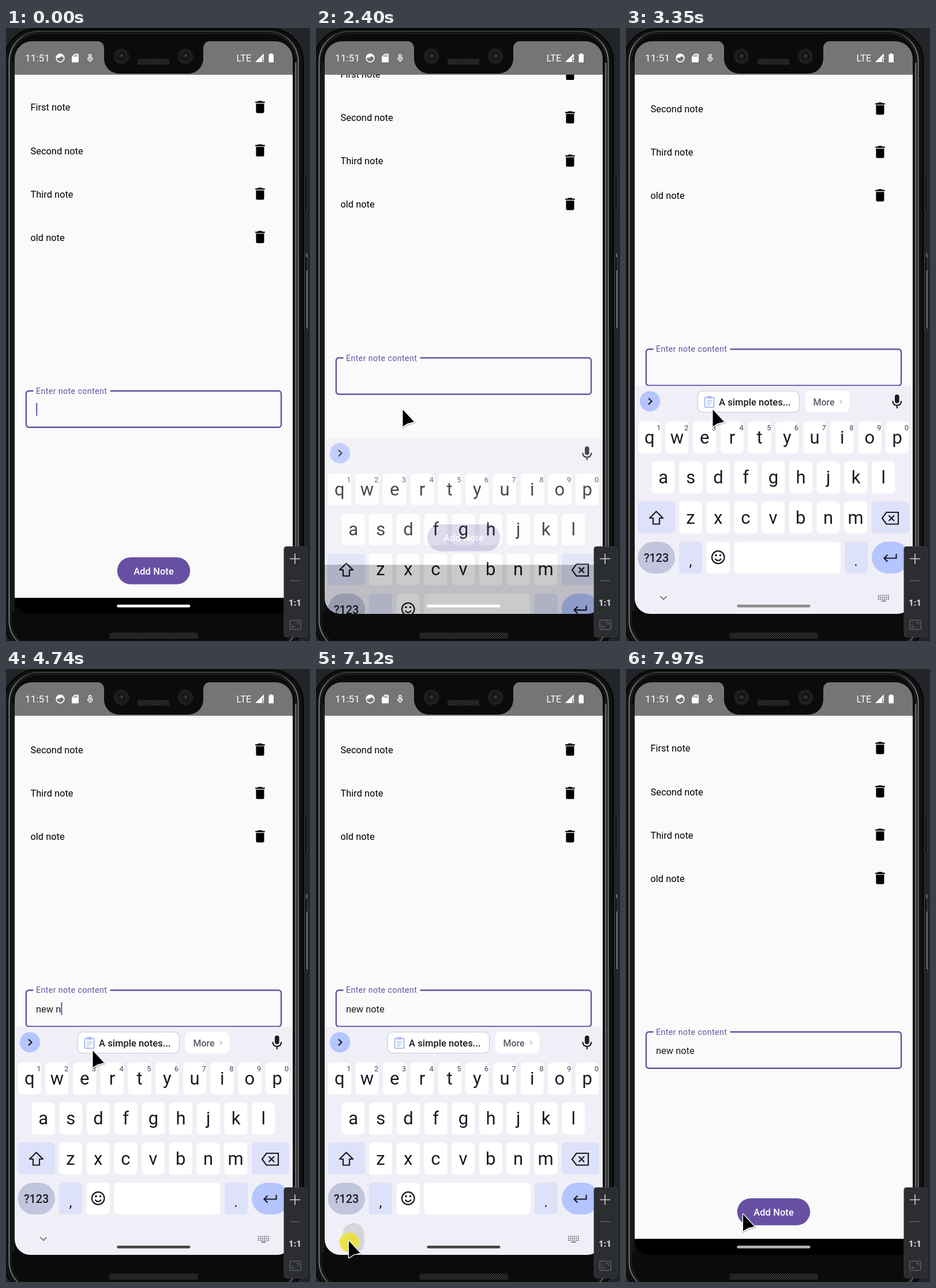
Write an HTML page that moves like this. It is 527 by 1062 pixels and loops after 8000 ms.

```html
<!DOCTYPE html>
<html lang="en">
<head>
<meta charset="utf-8">
<title>Notes app with keyboard</title>
<style>
html, body { margin: 0; width: 100%; height: 100%; overflow: hidden; background: #222427; }
svg { display: block; width: 527px; height: 1062px; }
text { font-family: Roboto, "Open Sans", sans-serif; white-space: pre; }
.note { font-size: 16.4px; fill: #1c1b1f; }
.mid { text-anchor: middle; }
.line { fill: none; stroke: #1b1b21; stroke-width: 2.2; }
</style>
</head>
<body>
<svg viewBox="0 0 527 1062" xmlns="http://www.w3.org/2000/svg">
  <defs>
    <clipPath id="screen"><path d="M15 53A30 30 0 0 1 45 23H467A30 30 0 0 1 497 53V988A27 27 0 0 1 470 1015H42A27 27 0 0 1 15 988Z"/></clipPath>
    <clipPath id="app"><rect x="15" y="80.5" width="482" height="936"/></clipPath>
    <linearGradient id="rim" x1="0" x2="1" y1="0" y2="0">
      <stop offset="0" stop-color="#7c7e7f"/><stop offset=".06" stop-color="#3a3c3d"/>
      <stop offset=".94" stop-color="#3a3c3d"/><stop offset="1" stop-color="#7c7e7f"/>
    </linearGradient>
    <pattern id="mesh" width="4" height="4" patternUnits="userSpaceOnUse">
      <rect width="4" height="4" fill="#0c0c0c"/>
      <path d="M0 0L4 4M4 0L0 4" stroke="#484848" stroke-width=".8"/>
    </pattern>
    <path id="bin" transform="scale(1.172)" d="M6 19c0 1.1.9 2 2 2h8c1.1 0 2-.9 2-2V7H6v12zM19 4h-3.5l-1-1h-5l-1 1H5v2h14V4z"/>
  </defs>

  <g id="device">
    <rect width="527" height="1062" fill="#222427"/>
    <rect x="517.5" y="252" width="5" height="66" rx="2" fill="#161718" stroke="#34373a"/>
    <rect x="517.5" y="390" width="5" height="135" rx="2" fill="#161718" stroke="#45484a"/>
    <path d="M521 391V397M521.5 420V520" stroke="#85888a" stroke-width="1.5"/>
    <rect x="-3" y="1.5" width="518" height="1082" rx="56" fill="#111213" stroke="#070707" stroke-width="3"/>
    <rect x="5.5" y="6" width="501" height="1072" rx="52" fill="#0a0b0b" stroke="url(#rim)" stroke-width="2"/>
    <rect x="9" y="9.5" width="494" height="1065" rx="48" fill="#0a0b0b" stroke="#1d1f1f" stroke-width="2"/>
    <path d="M502.3 60V1010" stroke="#606263" stroke-width="3"/>
    <path d="M12.5 60V1010" stroke="#2c2e2e" stroke-width="1.5"/>
    <rect x="179" y="1047.5" width="154" height="10.5" rx="3" fill="url(#mesh)"/>
  </g>

  <g clip-path="url(#screen)">
    <rect x="15" y="23" width="482" height="993"/>
    <g clip-path="url(#app)">
      <g id="content">
        <rect x="15" width="482" height="987.2" fill="#fafafa"/>
        <g id="list"></g>
        <path d="M47.5 628.8H39.5A4.6 4.6 0 0 0 34.9 633.4V687.2A4.6 4.6 0 0 0 39.5 691.8H472.5A4.6 4.6 0 0 0 477.1 687.2V633.4A4.6 4.6 0 0 0 472.5 628.8H180.5" fill="none" stroke="#6750a4" stroke-width="2.4"/>
        <text x="52" y="633.8" font-size="14.06" letter-spacing=".47" fill="#6750a4">Enter note content</text>
        <text id="typed" class="note" x="52" y="667.3"></text>
        <rect id="under" x="86.2" y="668.3" width="33" height="1.3" fill="#1c1b1f"/>
        <rect id="caret" y="649.7" width="2" height="22" fill="#6750a4"/>
        <rect x="192.8" y="917" width="126.4" height="46.8" rx="23.4" fill="#6750a4"/>
        <text class="mid" x="256" y="946.6" font-size="16.4" font-weight="500" letter-spacing=".12" fill="#fff">Add Note</text>
      </g>
      <g id="keyboard">
        <rect x="15" y="620" width="482" height="420" fill="#f0eff7"/>
        <g id="keys"></g>
      </g>
    </g>
    <rect x="15" y="23" width="482" height="57.5" fill="#757575"/>
    <rect id="handle" x="192.3" y="999" width="127.2" height="4.8" rx="2.4"/>
  </g>

  <path d="M158 22.5A12 12 0 0 1 170 34.5V53A26 26 0 0 0 196 79H316A26 26 0 0 0 342 53V34.5A12 12 0 0 1 354 22.5Z" fill="#0a0b0b"/>
  <g id="lenses"></g>
  <rect x="228" y="53.5" width="55" height="10" rx="3" fill="url(#mesh)"/>

  <g fill="#fff">
    <text x="33" y="58" font-size="17.3">11:51</text>
    <text x="399.5" y="57.5" font-size="16.4">LTE</text>
    <circle cx="94" cy="52" r="6.9" fill="none" stroke="#fff" stroke-width="1.6"/>
    <path d="M87.5 52Q88 45.5 94 45.5T100.5 52Q98 50.5 97 48.5Q93 52 87.5 52Z"/>
    <path d="M119 44.5H124.5Q126 44.5 126 46V58Q126 59.5 124.5 59.5H115.5Q114 59.5 114 58V49.5Z"/>
    <path d="M117.7 47.5V50M120.3 46V50M122.9 46V50" stroke="#757575" stroke-width="1.3"/>
    <circle cx="145.8" cy="48" r="2.2" fill="none" stroke="#fff" stroke-width="1.4"/>
    <path d="M145.8 57.8L142 54Q141.2 51.6 143.4 51.6Q145 51.8 145.8 53.4Q146.6 51.8 148.2 51.6Q150.4 51.6 149.6 54Z" fill="none" stroke="#fff" stroke-width="1.4"/>
    <path d="M447 44V59H432Z"/>
    <path d="M444 50.5H447.5V59.5H444Z" fill="#757575"/>
    <path d="M445.2 51H447V56H445.2ZM445.2 57.3H447V59H445.2Z"/>
    <path d="M457.7 44H461.7V45.6H464V59.5H455.5V45.6H457.7Z"/>
  </g>

  <g id="tools">
    <rect x="482" y="898.5" width="40" height="156.5" rx="4" fill="#2b2d30" stroke="#393b40"/>
    <path d="M492 919.5H510M501 910.5V928.5" stroke="#ced0d6" stroke-width="1.6"/>
    <path d="M492 957.5H510" stroke="#5b5e63" stroke-width="1.5"/>
    <text class="mid" x="501" y="1001" font-size="15" font-weight="900" fill="#ced0d6">1:1</text>
    <g fill="none" stroke="#5b5e63" stroke-width="1.5">
      <rect x="492" y="1026" width="19" height="16" rx="2"/>
      <path d="M502.5 1030H507V1034M500.5 1038H496V1034"/>
    </g>
  </g>

  <g id="pointer">
    <circle id="click" cx="1.3" cy="4" r="17.3" fill="#eee534" opacity=".86"/>
    <path d="M1 3V31.5L9.5 26.5L21 23.5Z" opacity=".18" stroke="#000" stroke-width="4" stroke-linejoin="round"/>
    <path d="M.5 1.2V30.3L8.8 25L20 22.2Z" stroke="#fff" stroke-width="2.6" stroke-linejoin="round" paint-order="stroke"/>
  </g>
</svg>
<script>
const $ = id => document.getElementById(id);
const clamp = v => Math.max(0, Math.min(1, v));
const within = (t, spans) => spans.some(([a, b]) => t >= a && t < b);

// Piecewise linear track: each stop is [time, ...values]
function track(stops, t) {
  let i = 0;
  while (i < stops.length - 2 && t >= stops[i + 1][0]) i++;
  const a = stops[i], b = stops[i + 1], k = clamp((t - a[0]) / (b[0] - a[0]));
  return a.slice(1).map((v, n) => v + (b[n + 1] - v) * k);
}

// Cubic bezier ease (.2, 0, 0, 1)
function ease(x) {
  if (x <= 0) return 0;
  if (x >= 1) return 1;
  let lo = 0, hi = 1, s;
  for (let i = 0; i < 24; i++) {
    s = (lo + hi) / 2;
    if (.6 * s * (1 - s) ** 2 + s ** 3 < x) lo = s; else hi = s;
  }
  return s * s * (3 - 2 * s);
}

// Static parts
$('list').innerHTML = ['First note', 'Second note', 'Third note', 'old note'].map((name, i) => {
  const y = i * 75.1;
  return `<text class="note" x="42.5" y="${143.4 + y}" style="fill:#000">${name}</text>
    <use href="#bin" x="426.4" y="${122.8 + y}"/>`;
}).join('');

$('lenses').innerHTML = [200, 311].map(x =>
  `<circle cx="${x}" cy="49" r="13.5" fill="#1b1d1f"/><circle cx="${x}" cy="49" r="8.5" fill="#111314" stroke="#292c2e"/>
   <circle cx="${x}" cy="49" r="4" fill="#23272a"/><circle cx="${x + 1}" cy="47.5" r="1.5" fill="#43484c"/>`).join('');

const key = (x, y, w, fill = '#fff', r = 6) =>
  `<rect x="${x}" y="${y}" width="${w}" height="55" rx="${r}" fill="${fill}"/>`;
const label = (x, y, size, s, fill = '#1b1b21', more = '') =>
  `<text class="mid" x="${x}" y="${y}" font-size="${size}" fill="${fill}" ${more}>${s}</text>`;
const icon = (d, more = '') => `<path class="line" d="${d}" ${more}/>`;

function buildKeys() {
  const pitch = 47.7, tint = '#dde1f9';
  let out = '';
  [['qwertyuiop', 40.8], ['asdfghjkl', 64.6], ['zxcvbnm', 112]].forEach(([row, x0], r) => {
    [...row].forEach((c, i) => {
      const x = x0 + i * pitch, y = 682 + r * 69.3;
      out += key(x - 20, y, 40) + label(x, y + 38, 31, c);
      if (!r) out += label(x + 16.2, 697, 13, (i + 1) % 10, '#45464f');
    });
  });
  out += key(20.5, 820.6, 64.5, tint) + key(426, 820.6, 65, tint);
  out += key(20.5, 890, 64.5, '#c1c5dd', 27.5) + key(92, 890, 40, tint) + key(139.7, 890, 40);
  out += key(187.4, 890, 184) + key(379, 890, 40, tint) + key(426, 890, 65, '#b4c5ff', 27.5);
  out += label(52.5, 925, 19.7, '?123', '#1b1b21', 'font-weight="500"');
  out += label(112, 932, 25, ',') + label(398.5, 932, 25, '.');
  // Shift, backspace, smiley, enter
  out += icon('M52.5 837.5L64 849H58V859.5H47V849H41Z', 'stroke-linejoin="round"');
  out += icon('M451.5 839H472V859.5H451.5L444 849.2ZM455.5 844.5L465 854M465 844.5L455.5 854');
  out += icon('M170.5 917A10.8 10.8 0 1 1 148.9 917A10.8 10.8 0 1 1 170.5 917M154.5 919.5Q159.7 926 164.9 919.5');
  out += '<circle cx="156" cy="913.5" r="1.7"/><circle cx="163.5" cy="913.5" r="1.7"/>';
  out += icon('M468.5 911V918.5H448M453.5 912.5L447.5 918.5L453.5 924.5');
  // Toolbar
  out += '<circle cx="41.5" cy="646.8" r="17.6" fill="#b4c5ff"/>' + icon('M39 641.5L44.5 646.8L39 652.1');
  out += '<rect x="466" y="635" width="7.6" height="15" rx="3.8" fill="#1b1b21"/>';
  out += icon('M462.3 646Q462.8 653.8 469.8 653.8T477.3 646M469.8 653.8V659');
  out += `<g id="chips"><rect x="124" y="629" width="176.5" height="36.5" rx="9" fill="#fff" stroke="#c5c8db" stroke-width="1.2"/>
    <rect x="136.5" y="640" width="16" height="17" rx="1.5" fill="none" stroke="#a9bdf8" stroke-width="2"/>
    <path d="M140.5 637.5H148.5V642H140.5Z" fill="#a9bdf8"/>
    <path d="M140 646H149M140 649.5H149M140 653H146" stroke="#a9bdf8" stroke-width="1.5"/>
    <text x="161" y="654" font-size="16.6" font-weight="500" fill="#1b1b21">A simple notes...</text>
    <rect x="310.5" y="628.5" width="77" height="37.5" rx="9" fill="#fff"/>
    <text x="324.5" y="653.5" font-size="16" font-weight="500" fill="#5a5b65">More</text>
    <path d="M371 644L374.2 647.3L371 650.6" fill="none" stroke="#b8b9c6" stroke-width="1.5"/></g>`;
  // Bottom row
  out += '<rect id="press" x="46.5" y="960" width="37" height="53" rx="18.5" fill="#d6d5dc"/>';
  out += icon('M59.5 984.5L65 990L70.5 984.5', 'style="stroke:#55565f;stroke-width:1.5"');
  for (let r = 0; r < 3; r++)
    out += `<path d="M437 ${983 + r * 3.3}H456" stroke="#55565f" stroke-width="1.7" stroke-dasharray="1.9 1.5"/>`;
  out += '<path d="M442.5 992.8H450.5" stroke="#55565f" stroke-width="1.6"/>';
  return out;
}
$('keys').innerHTML = buildKeys();

// Timeline
const LOOP = 8000;
const caretOn = [[0, 180], [660, 1160], [1640, 2300], [2620, 3120], [3600, 5620], [6120, 6620], [7190, 7620]];
const clicks = [[1740, 1970], [6950, 7220]];
const strokes = [4030, 4130, 4230, 4430, 4740, 4840, 4950, 5110];
const path = [
  [470, 343, 839], [560, 312, 760], [660, 272, 655], [740, 235, 604], [840, 182, 625], [930, 156, 653], [1000, 150, 660],
  [5880, 150, 660], [5910, 72, 738], [6010, 28, 812], [6130, 3, 890], [6280, 8, 960], [6430, 28, 997], [6560, 43, 997],
  [6700, 53, 991], [6770, 56.5, 989.5], [7560, 56.5, 989.5], [7650, 84, 982], [7730, 123, 966], [7840, 178, 949], [7970, 202.5, 943.5]
];
const handleTone = [[2900, 255], [3120, 200], [3350, 142], [3580, 100], [3860, 70], [7560, 70], [7970, 180], [8000, 190]];

const show = (id, on) => $(id).setAttribute('visibility', on ? 'visible' : 'hidden');
const move = (id, x, y) => $(id).setAttribute('transform', `translate(${x.toFixed(2)} ${y.toFixed(2)})`);
let shown = null, textWidth = 0;

function draw(t) {
  const open = t < 7000 ? ease((t - 2290) / 285) : 1 - ease((t - 7280) / 340);
  move('content', 0, -72.3 * open);
  move('keyboard', 0, 433 * (1 - open));
  $('keyboard').setAttribute('opacity', open);
  $('chips').setAttribute('opacity', clamp((t - 2620) / 150));
  $('press').setAttribute('opacity', clamp((t - 6950) / 90) * clamp((7350 - t) / 120));

  const count = strokes.filter(s => t >= s).length;
  if (count !== shown) {
    $('typed').textContent = 'new note'.slice(0, count);
    textWidth = count ? $('typed').getComputedTextLength() : 0;
    shown = count;
  }
  $('caret').setAttribute('x', 52.2 + textWidth);
  show('caret', within(t, caretOn));
  show('under', t >= 5340 && t < 7000);

  const tone = Math.round(track(handleTone, t)[0]);
  $('handle').setAttribute('fill', `rgb(${tone},${tone},${tone})`);

  const [x, y] = track(path, t);
  move('pointer', x, y);
  show('pointer', t >= 470);
  show('click', within(t, clicks));
}

const start = performance.now();
function tick() {
  draw((performance.now() - start) % LOOP);
  requestAnimationFrame(tick);
}
tick();
</script>
</body>
</html>
```
